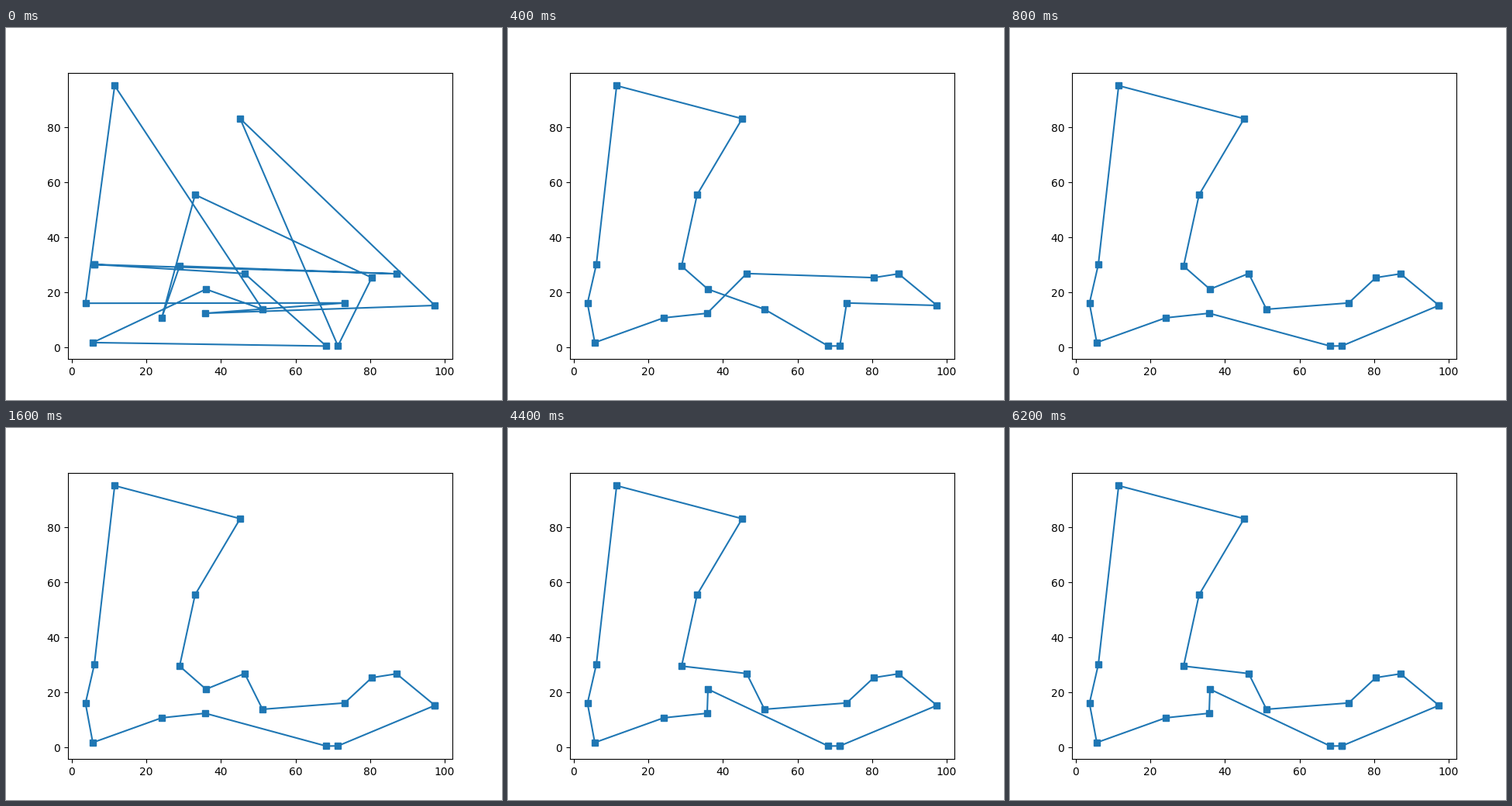
A matplotlib script that plays this animation: 640x480 px, repeating every 8000 ms.

```python
import matplotlib.pyplot as plt
from matplotlib.animation import FuncAnimation

INTERVAL = 200
LOOP = 8000

CITIES = {
    "A": (11.48, 95.2), "B": (45.15, 83.2), "C": (33.06, 55.55),
    "D": (80.46, 25.4), "E": (71.37, 0.58), "F": (68.25, 0.53),
    "G": (97.4, 15.3), "H": (35.76, 12.45), "I": (73.18, 16.2),
    "J": (3.65, 16.1), "K": (51.14, 13.9), "L": (35.97, 21.2),
    "M": (5.61, 1.8), "N": (28.9, 29.6), "O": (24.12, 10.8),
    "P": (6.03, 30.2), "Q": (46.36, 26.9), "R": (87.11, 26.8),
}

# Start time in ms and visiting order of each route
SHORT = "GEFHOMJPABCNLQKIDR"
FINAL = "EFLHOMJPABCNQKIDRG"
ROUTES = [
    (0, "PRNOCDEBGHIJAKLMFQ"),
    (200, "RGKHOMJPABCNLQFEID"),
    (400, "RDQHOMJPABCNLKFEIG"),
    (800, SHORT),
    (1200, "GEFHOMJPNLCABQKIDR"),
    (1600, SHORT),
    (4400, FINAL),
    (6000, "EFKQLHOMJPABCNIDRG"),
    (6200, FINAL),
]


def closed_path(route):
    return zip(*(CITIES[name] for name in route + route[0]))


def route_at(time):
    return [route for start, route in ROUTES if start <= time][-1]


fig, ax = plt.subplots(figsize=(6.4, 4.8), dpi=100)
line, = ax.plot(*closed_path(ROUTES[0][1]), marker="s", linestyle="-")


def update(frame):
    line.set_data(*map(list, closed_path(route_at(frame * INTERVAL))))
    return line,


anim = FuncAnimation(fig, update, frames=LOOP // INTERVAL,
                     interval=INTERVAL, repeat=True, repeat_delay=0)
plt.show()
```
